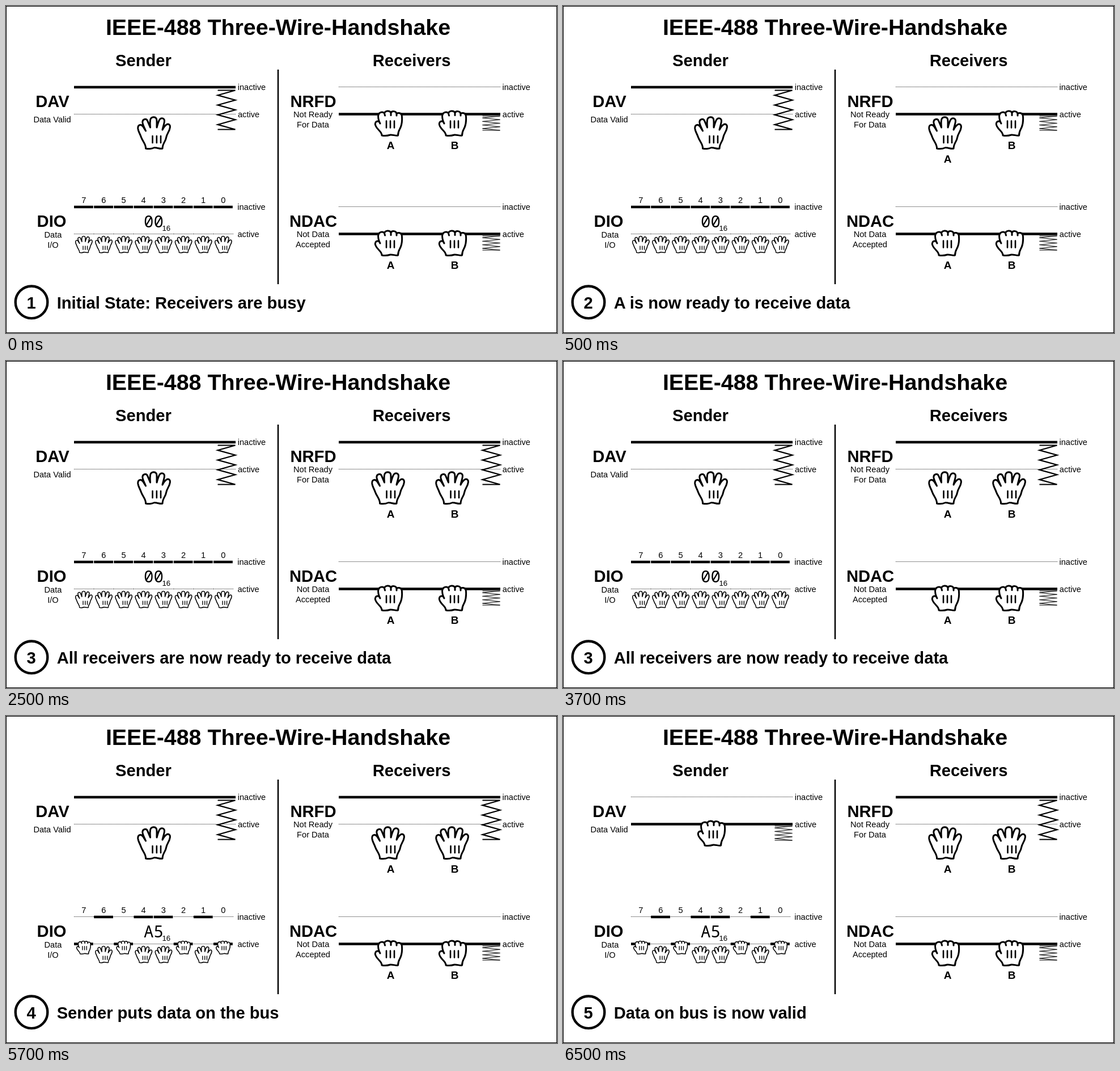
Recreate the animation shown at these times as an HTML page. Size 972 by 576 pixels, loop 8000 ms.

```html
<!DOCTYPE html>
<html lang="en">
<head>
<meta charset="utf-8">
<title>IEEE-488 Three-Wire-Handshake</title>
<style>
html, body { margin: 0; width: 100%; height: 100%; overflow: hidden; background: #fff; }
svg { display: block; width: 100vw; height: 100vh; }
text { font: 14.6px "Liberation Sans", Arial, sans-serif; }
.mid { text-anchor: middle; }
.title { font-size: 39.4px; font-weight: bold; }
.head { font-size: 29.15px; font-weight: bold; }
.tag { font-size: 19px; font-weight: bold; }
.hex { font: 29px "Noto Sans Mono", "DejaVu Sans Mono", monospace; }
.sub { font-size: 13.2px; }
.wire { stroke: #000; stroke-width: 4.4; }
.rest { stroke: #222; stroke-width: 1; stroke-dasharray: 1 1; }
.spring { fill: none; stroke: #000; stroke-linejoin: miter; }
.hand { fill: #fff; stroke: #000; stroke-width: 3; stroke-linejoin: round; stroke-linecap: round; }
.hand .bars { stroke-width: 2.6; }
</style>
</head>
<body>
<svg viewBox="0 0 972 576" xmlns="http://www.w3.org/2000/svg">
  <defs>
    <g id="open" class="hand">
      <path d="M15.5 57C16 49 10 45 7 36C5 30 2.5 28 1.8 22C1.2 15 7 13.5 10.5 18L15.5 26
        C13 20 9.5 14 9.8 10C10.5 4.5 16.5 4 18.5 8L23.5 20C23 14 22.5 9 24 5C26 0.5 33 0.5 34.5 5
        C35.5 9 34.8 14 35 20C36.5 15 37.5 10 40 6C42.5 2 48.5 3.5 48.5 8.5C48.3 13.5 46 18 45 24
        C47 20 49 17 52 15C55.5 12.5 59 15 58.3 20C57.5 27 52.5 31 51.5 38C50.5 45 45 48 45 57
        C40 58.2 36 55.2 30.5 55.5C25 58 20 58 15.5 57Z"/>
      <path class="bars" d="M27.5 35V47M34.8 35V47M42 35V47"/>
    </g>
    <g id="fist" class="hand">
      <path d="M13 45C13 41 11 39 8 36C3 31 0 25.5 2 22C3.5 19.5 7 19.5 8.5 21C6 14 6 8 9 5.5
        C12 3.2 16 3.8 17.5 6C19 1 27 0.8 29 5C31 1.2 38 2 39 6.5C42 4.5 48 5 48.4 11
        C49 18 48.5 25 46 31C44 35 41.5 38 41.5 45C37 46 33 43.5 28 44C22 46 18 46 13 45Z"/>
      <path d="M17.5 6L18.5 10M29 5V9.5M39 6.5V10M8.5 21L10 24" fill="none"/>
      <path class="bars" d="M21 19.5V31.5M28 19.5V31.5M35 19.5V31.5"/>
    </g>
  </defs>
  <rect x=".5" y=".5" width="971" height="575" fill="#fff" stroke="#000"/>
  <g id="base"></g>
  <g id="scene"></g>
</svg>
<script>
const LOOP = 8000, PITCH = 35.15;
const steps = [
  { at: 0, text: "Initial State: Receivers are busy", holdA: true, holdB: true },
  { at: 500, text: "A is now ready to receive data", holdB: true },
  { at: 2500, text: "All receivers are now ready to receive data" },
  { at: 4500, text: "Sender puts data on the bus", data: 0xA5 },
  { at: 6500, text: "Data on bus is now valid", data: 0xA5, valid: true }
];

const text = (x, y, s, cls = "") => `<text x="${x}" y="${y}" class="${cls}">${s}</text>`;
const line = (x1, x2, y, cls) => `<path class="${cls}" d="M${x1} ${y}H${x2}"/>`;
const hand = (kind, x, y, scale = 1) =>
  `<use href="#${kind}" transform="translate(${x} ${y}) scale(${scale})"/>`;

function spring(x, top, bottom, weight) {
  const right = x + 31, n = 8;
  let d = `M${x} ${top}H${right}`;
  for (let i = 1; i <= n; i++)
    d += `L${i % 2 ? x : right} ${top + (bottom - top) * i / n}`;
  return `<path class="spring" stroke-width="${weight}" d="${d}H${x}"/>`;
}

// One pulled-up signal line; y is its inactive level.
function wire(x, y, active) {
  const end = x + 285, low = y + 47.5;
  return line(x, end, active ? y - .5 : low, "rest") +
    line(x, end, active ? low : y, "wire") +
    (active ? spring(x + 253.5, y + 51, y + 76, 1) : spring(x + 253.5, y + 5.5, y + 74.5, 2.2));
}

function receiver(name, x, y, holding) {
  return (holding ? hand("fist", x, y + 40) : hand("open", x - 6, y + 51)) +
    text(x + 28.5, y + (holding ? 108.5 : 132.5), name, "tag mid");
}

function bus(data) {
  let out = "";
  for (let i = 0; i < 8; i++) {
    const x = 120 + i * PITCH, on = data >> (7 - i) & 1;
    out += line(Math.round(x), Math.round(x + PITCH), on ? 353.5 : 401.5, "rest") +
      line(x, x + 33.8, on ? 401.5 : 354, "wire");
  }
  for (let i = 0; i < 8; i++) {
    const x = i * PITCH, on = data >> (7 - i) & 1;
    out += on ? hand("fist", 124 + x, 395.5, .52) : hand("open", 121.7 + x, 404.7, .52);
  }
  return out + text(243, 389.5, data.toString(16).toUpperCase().padStart(2, "0"), "hex");
}

function labels() {
  let out = text(480, 51, "IEEE-488 Three-Wire-Handshake", "title mid") +
    text(242.5, 106, "Sender", "head mid") + text(715.5, 106, "Receivers", "head mid") +
    `<path d="M480 112V490" stroke="#000" stroke-width="2.5"/>`;
  for (const [x, y] of [[408.7, 147.5], [408.2, 358.5], [875.5, 147.5], [875.5, 358.5]])
    out += text(x, y, "inactive") + text(x + .3, y + 48, "active");
  const names = [
    [82, 178, "DAV"], [80.5, 389, "DIO"], [542, 178, "NRFD"], [542, 389, "NDAC"]
  ];
  const notes = [
    [81.5, 205, "Data Valid"], [83, 407.5, "Data"], [83, 425.5, "I/O"],
    [541.5, 196, "Not Ready"], [541.5, 214, "For Data"],
    [541.5, 407, "Not Data"], [541.5, 425, "Accepted"]
  ];
  for (const n of names) out += text(...n, "head mid");
  for (const n of notes) out += text(...n, "mid");
  for (let i = 0; i < 8; i++) out += text(137.2 + i * PITCH, 347, 7 - i, "mid");
  return out + text(275.5, 395.5, "16", "sub") +
    `<circle cx="45" cy="521.8" r="28.3" fill="none" stroke="#000" stroke-width="4.4"/>`;
}

function draw(step, number) {
  const { holdA, holdB, valid, data = 0 } = step;
  return wire(120, 143, valid) +
    (valid ? hand("fist", 237, 183) : hand("open", 231, 194)) +
    bus(data) +
    wire(587, 143, holdA || holdB) +
    receiver("A", 650, 143, holdA) + receiver("B", 763, 143, holdB) +
    wire(587, 354, true) +
    receiver("A", 650, 354, true) + receiver("B", 763, 354, true) +
    text(44.5, 532.5, number, "head mid") + text(89.7, 533, step.text, "head");
}

const scene = document.getElementById("scene");
let shown = -1;

function update(now) {
  const t = now % LOOP;
  const index = steps.findLastIndex(s => s.at <= t);
  if (index !== shown) {
    scene.innerHTML = draw(steps[index], index + 1);
    shown = index;
  }
}

document.getElementById("base").innerHTML = labels();
const start = performance.now();
function tick() {
  update(performance.now() - start);
  requestAnimationFrame(tick);
}
tick();
</script>
</body>
</html>
```
